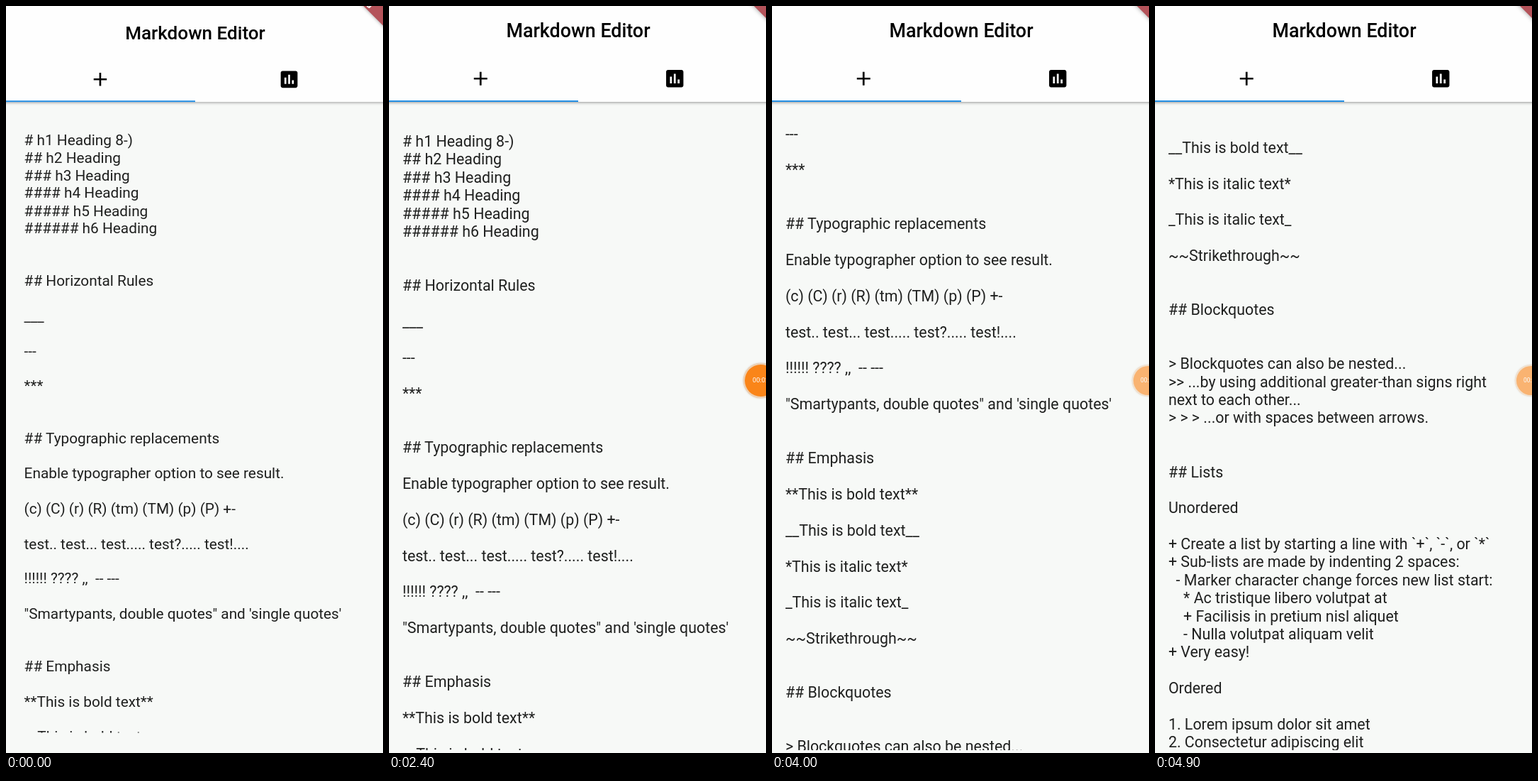
An HTML page that plays this animation: 532 by 1052 pixels, repeating every 5 s.

```html
<!DOCTYPE html>
<html lang="en">
<head>
<meta charset="utf-8">
<title>Markdown Editor</title>
<style>
  html, body { margin: 0; width: 100%; height: 100%; overflow: hidden; background: #f7f9f7; }
  body { font-family: Roboto, sans-serif; position: relative; }
  div, pre, svg { position: absolute; margin: 0; }
  #stage { left: 0; top: 0; width: 532px; height: 1052px; overflow: hidden; background: #f7f9f7; }
  #screen { left: 0; top: 0; width: 532px; height: 1052px; transform-origin: 266px 140px; }
  #bar { left: -20px; top: -20px; width: 572px; height: 155px; background: #fefefe; box-shadow: 0 1px 4px rgba(0, 0, 0, .42); }
  #title { left: 0; top: 19px; width: 534px; text-align: center; font-weight: 500; font-size: 26.8px; line-height: 32px; color: #000; }
  #indicator { left: -20px; top: 132.5px; width: 286.5px; height: 2.8px; background: #2590e6; }
  svg { top: 85.8px; width: 32.5px; height: 32.5px; }
  #page { left: 0; top: 177px; width: 532px; height: 871px; overflow: hidden; }
  #text { left: 18.9px; top: 1px; font: 21.4px/25.38px Roboto, sans-serif; color: #1f201f; }
  #ribbon {
    left: 485px; top: -54px; width: 46px; height: 16px; padding: 8px 74px 0 0;
    transform: rotate(45deg); transform-origin: 0 100%;
    background: #b4535a; color: #fff; box-shadow: 0 0 6px rgba(0, 0, 0, .4);
    font-weight: 900; font-size: 13.8px; line-height: 16px; direction: rtl; white-space: nowrap;
  }
  #timer {
    left: 485.5px; top: 501px; width: 53px; height: 53px; border-radius: 50%;
    background: #fb7a04; box-shadow: 0 0 0 3px #ecceb0, 0 0 4px 3px rgba(0, 0, 0, .12);
    color: #fff; font-size: 10.9px; line-height: 54px; text-align: center;
  }
</style>
</head>
<body>
<div id="stage">
  <div id="screen">
    <div id="bar"></div>
    <div id="title">Markdown Editor</div>
    <svg style="left:113.2px" viewBox="0 0 24 24"><path d="M19 13h-6v6h-2v-6H5v-2h6V5h2v6h6z"/></svg>
    <svg style="left:387.3px" viewBox="0 0 24 24"><path d="M19 3H5c-1.1 0-2 .9-2 2v14c0 1.1.9 2 2 2h14c1.1 0 2-.9 2-2V5c0-1.1-.9-2-2-2zM9 17H7v-7h2zM13 17h-2V7h2zM17 17h-2v-4h2z"/></svg>
    <div id="indicator"></div>
    <div id="page"><pre id="text">
# h1 Heading 8-)
## h2 Heading
### h3 Heading
#### h4 Heading
##### h5 Heading
###### h6 Heading


## Horizontal Rules

___

---

***


## Typographic replacements

Enable typographer option to see result.

(c) (C) (r) (R) (tm) (TM) (p) (P) +-

test.. test... test..... test?..... test!....

!!!!!! ???? ,,  -- ---

"Smartypants, double quotes" and 'single quotes'


## Emphasis

**This is bold text**

__This is bold text__

*This is italic text*

_This is italic text_

~~Strikethrough~~


## Blockquotes


&gt; Blockquotes can also be nested...
&gt;&gt; ...by using additional greater-than signs right
next to each other...
&gt; &gt; &gt; ...or with spaces between arrows.


## Lists

Unordered

+ Create a list by starting a line with `+`, `-`, or `*`
+ Sub-lists are made by indenting 2 spaces:
  - Marker character change forces new list start:
    * Ac tristique libero volutpat at
    + Facilisis in pretium nisl aliquet
    - Nulla volutpat aliquam velit
+ Very easy!

Ordered

1. Lorem ipsum dolor sit amet
2. Consectetur adipiscing elit
</pre></div>
    <div id="ribbon">DEBUG</div>
  </div>
  <div id="timer"></div>
</div>
<script>
const LOOP = 5000, STEP = 100;
const [screenEl, text, timer] = ['screen', 'text', 'timer'].map(id => document.getElementById(id));

const progress = (t, from, to) => Math.min(1, Math.max(0, (t - from) / (to - from)));
const easeOut = u => 1 - (1 - u) ** 2;
const smooth = u => u * u * (3 - 2 * u);
const mix = (a, b, u) => a + (b - a) * u;

// Two flings: [time, offset, velocity]
const scrollKeys = [
  [3220, 0, 0], [3600, 201.7, .5], [4000, 315.5, .15], [4400, 630, .75], [4900, 854, .3]
];

function scrollAt(t) {
  if (t <= scrollKeys[0][0]) return 0;
  const i = Math.max(1, scrollKeys.findIndex(key => t <= key[0]));
  const [t0, y0, v0] = scrollKeys[i - 1], [t1, y1, v1] = scrollKeys[i];
  const d = t1 - t0, u = (t - t0) / d, s = smooth(u);
  return mix(y0, y1, s) + d * u * (1 - u) * (v0 * (1 - u) - v1 * u);
}

function draw(t) {
  const zoom = mix(.973, 1, easeOut(progress(t, 100, 700)));
  screenEl.style.transform = zoom < 1 ? `scale(${zoom})` : 'none';
  text.style.transform = `translateY(${-scrollAt(t)}px)`;

  const dock = smooth(progress(t, 2000, 2650));
  timer.style.transform = `translateX(${18 * dock}px) scale(${mix(1, .775, dock)})`;
  timer.style.opacity = progress(t, 700, 1000) * mix(1, .55, progress(t, 2300, 2800));
  timer.textContent = '00:0' + Math.max(0, Math.floor((t - 300) / 1000));
}

function tick() {
  const t = performance.now() % LOOP;
  draw(Math.floor(t / STEP) * STEP);
  requestAnimationFrame(tick);
}
tick();
</script>
</body>
</html>
```
